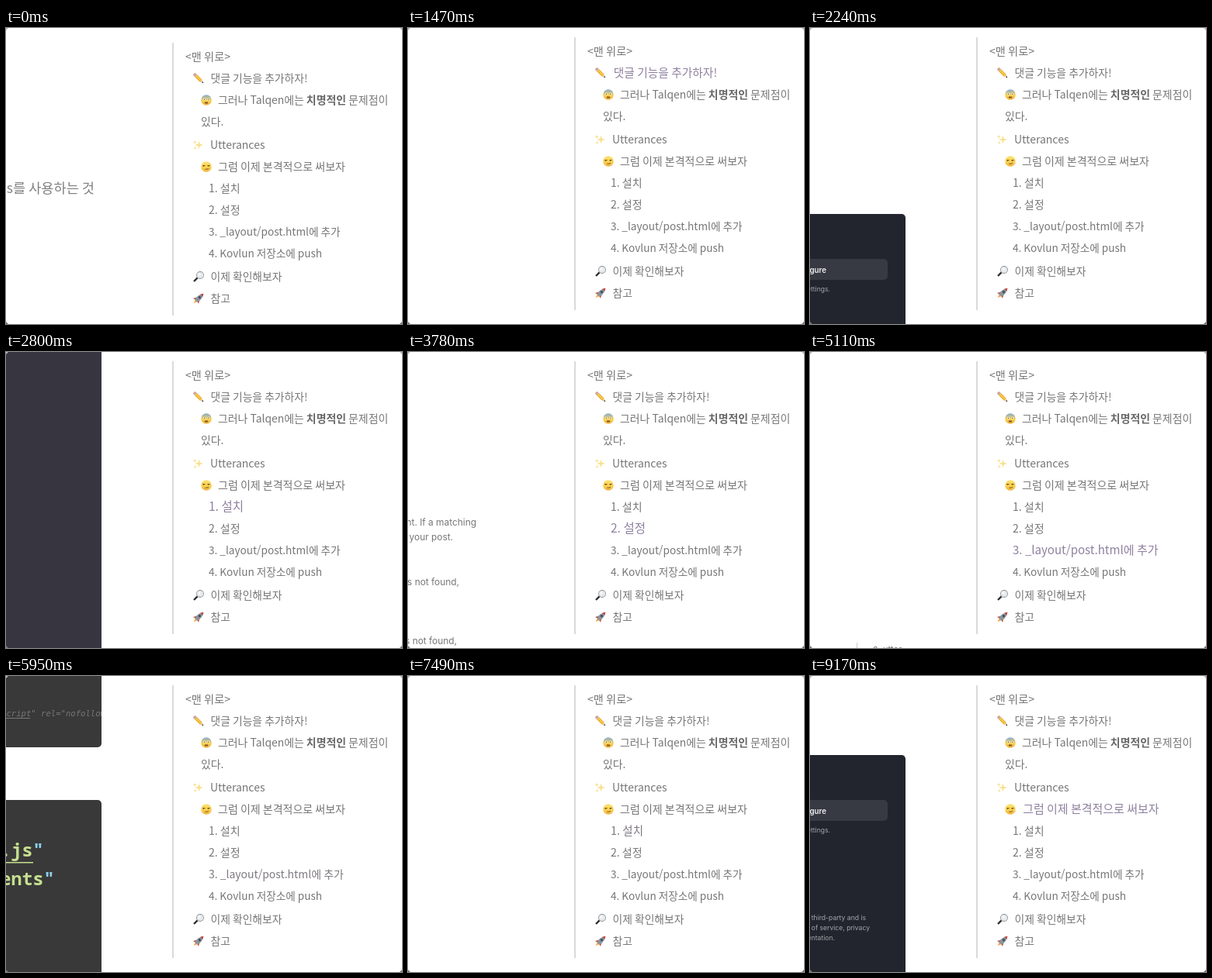
Write an HTML page with a canvas that moves like this. It is 510 px wide and 382 px high and loops after 9.45 s.

```html
<!DOCTYPE html>
<html lang="ko">
<head>
<meta charset="utf-8">
<title>Table of contents</title>
<style>
html, body { margin: 0; width: 100%; height: 100%; overflow: hidden; background: #fff; }
canvas { display: block; width: 510px; height: 382px; }
</style>
</head>
<body>
<canvas id="stage"></canvas>
<script>
const W = 510, H = 382, LOOP = 9450, TICK = 70, FADE = 210;
const KR = '"Noto Sans CJK KR", "Noto Sans CJK", sans-serif';
const MONO = '"Noto Sans Mono", "DejaVu Sans Mono", monospace';
const canvas = document.getElementById('stage');
const ctx = canvas.getContext('2d');
const dpr = window.devicePixelRatio || 1;
canvas.width = W * dpr;
canvas.height = H * dpr;

// [time, scroll position]
const scrollKeys = [
  [0, 0], [560, 0], [840, 40], [910, 40], [980, 50], [1050, 50], [1190, 117],
  [1400, 117], [1470, 250], [1610, 330], [1680, 330], [1960, 560], [2030, 560],
  [2240, 760], [2380, 760], [2800, 1600], [2940, 1600], [3010, 1882], [3150, 1882],
  [3780, 2400], [3920, 2430], [3990, 2430], [4130, 2470], [4200, 2470], [4760, 2800],
  [4830, 2800], [4970, 2940], [5040, 2940], [5110, 3000], [5530, 3720], [5950, 3500],
  [6020, 3420], [6370, 560], [8540, 560], [9170, 898], [LOOP, 898]
];

// on: pairs of [start of highlight, start of fade-out]
const items = [
  { y: 30, x: 231, text: '<맨 위로>', size: 14.2 },
  { y: 58, x: 263.5, text: '댓글 기능을 추가하자!', size: 13.8, icon: pencil, ix: 248, on: [[1260, 1540]] },
  { y: 86, x: 273, text: '그러나 Talqen에는 ', bold: '치명적인', tail: ' 문제점이', size: 13.9,
    icon: fearful, ix: 258, on: [[1540, 1750]] },
  { y: 144, x: 263, text: 'Utterances', icon: sparkles, ix: 247, on: [[2380, 2590], [8050, 8610]] },
  { y: 172, x: 273, text: '그럼 이제 본격적으로 써보자', icon: smirk, ix: 258, on: [[8680, 9900]] },
  { y: 200, x: 261, text: '1. 설치', on: [[2590, 3220], [7070, 7350]], grow: .11 },
  { y: 228, x: 261, text: '2. 설정', on: [[3500, 4340], [6720, 7000]], grow: .11 },
  { y: 256, x: 261, text: '3. _layout/post.html에 추가', size: 13.6,
    on: [[4480, 5180], [5900, 6160]], grow: .107 },
  { y: 284, x: 261, text: '4. Kovlun 저장소에 push', size: 13.6, on: [[5250, 5670]] },
  { y: 314, x: 263.5, text: '이제 확인해보자', size: 13.8, icon: magnifier, ix: 248 },
  { y: 342, x: 263.5, text: '참고', size: 13.8, icon: rocket, ix: 248 }
];

const clamp = v => Math.max(0, Math.min(1, v));
const mix = (a, b, k) => a + (b - a) * k;

function scrollAt(t) {
  const i = scrollKeys.findIndex(k => k[0] > t);
  const [t0, s0] = scrollKeys[i - 1], [t1, s1] = scrollKeys[i];
  return Math.round(mix(s0, s1, (t - t0) / (t1 - t0)));
}

function highlight(item, t) {
  return Math.max(0, ...(item.on || []).map(([a, b]) =>
    Math.min(clamp((t - a) / FADE), 1 - clamp((t - b) / FADE))));
}

function write(str, x, y, font, color, align = 'left') {
  ctx.font = font;
  ctx.fillStyle = color;
  ctx.textAlign = align;
  ctx.fillText(str, x, y);
  return x + ctx.measureText(str).width;
}

function box(x, y, w, h, r, color) {
  ctx.fillStyle = color;
  ctx.beginPath();
  ctx.roundRect(x, y, w, h, r);
  ctx.fill();
}

function disc(x, y, r, color) {
  ctx.fillStyle = color;
  ctx.beginPath();
  ctx.arc(x, y, r, 0, 7);
  ctx.fill();
}

function poly(color, ...p) {
  ctx.fillStyle = color;
  ctx.beginPath();
  for (let i = 0; i < p.length; i += 2) ctx.lineTo(p[i], p[i + 1]);
  ctx.fill();
}

function stroke(color, width, path) {
  ctx.strokeStyle = color;
  ctx.lineWidth = width;
  ctx.stroke(new Path2D(path));
}

// Icons, drawn around 0,0
function pencil() {
  ctx.rotate(Math.PI / 4);
  box(-8.5, -2, 3, 4, 1.2, '#d9a08e');
  box(-6.2, -2, 1.6, 4, 0, '#b9b4a8');
  box(-4.6, -2, 9.4, 4, 0, '#eba62c');
  box(-4.6, -1, 9.4, 1.6, 0, '#fbd04f');
  poly('#e6cba4', 4.8, -2, 8.6, 0, 4.8, 2);
  poly('#333', 6.8, -1, 9, 0, 6.8, 1);
}

function face(top) {
  const g = ctx.createLinearGradient(0, -7, 0, 7);
  g.addColorStop(0, top);
  g.addColorStop(.55, '#fad24f');
  g.addColorStop(1, '#eeae3a');
  disc(0, 0, 6.8, g);
}

function fearful() {
  face('#7fa9d6');
  disc(-2.5, -.8, 1.4, '#fff');
  disc(2.5, -.8, 1.4, '#fff');
  disc(-2.5, -.7, .7, '#4b3420');
  disc(2.5, -.7, .7, '#4b3420');
  box(-2.2, 2.6, 4.4, 1.8, .9, '#7a5228');
}

function smirk() {
  face('#fde272');
  stroke('#7d5a28', 1, 'M-4.8-1.4H-1.4M1.4-1.4H4.8M-1.6 3.2Q1.2 3.6 3 2.2');
  disc(-3.4, -.9, .8, '#6b451f');
  disc(2.6, -.9, .8, '#6b451f');
}

function star(x, y, r) {
  ctx.fillStyle = '#f8df88';
  ctx.beginPath();
  for (let i = 0; i < 8; i++) {
    const d = i % 2 ? r * .3 : r, a = i * Math.PI / 4;
    ctx.lineTo(x + d * Math.cos(a), y + d * Math.sin(a));
  }
  ctx.fill();
}

function sparkles() {
  star(1.6, 0, 5.4);
  star(-3.8, -3.6, 2.8);
  star(-3.4, 4, 2.6);
}

function magnifier() {
  stroke('#2f2f2f', 2.4, 'M-1.4 1.4L-6 6');
  disc(2, -2, 4.9, '#8b8e90');
  disc(2, -2, 4.1, '#e6eaec');
  disc(1, -3, 1.8, '#f6f9fa');
}

function rocket() {
  ctx.rotate(Math.PI / 4);
  poly('#f3a63a', -1.8, 4, 0, 9, 1.8, 4);
  poly('#b8423c', -2, 0, -5, 5, -2, 4);
  poly('#b8423c', 2, 0, 5, 5, 2, 4);
  ctx.fillStyle = '#8d939b';
  ctx.fill(new Path2D('M0-9Q4.6-3 2.2 4.6H-2.2Q-4.6-3 0-9Z'));
  poly('#c2443f', 0, -9, 2.2, -5.4, -2.2, -5.4);
  disc(0, -2, 1.5, '#34495e');
}

function drawItem(item, t) {
  const k = highlight(item, t);
  const size = (item.size || 14) * (1 + (item.grow || .07) * k);
  const color = `rgb(${mix(118, 142, k)},${mix(118, 128, k)},${mix(118, 158, k)})`;
  const font = `300 ${size}px ${KR}`;
  const y = item.y + 5.2;
  let x = write(item.text, item.x + k * (item.icon ? 1.2 : 0), y, font, color);
  if (item.icon) {
    ctx.save();
    ctx.translate(item.ix, item.y);
    item.icon();
    ctx.restore();
  }
  if (!item.bold) return;
  x = write(item.bold, x, y, `700 ${size}px ${KR}`, k ? color : '#686868');
  // the last word drops to the next line when it no longer fits
  const fits = x + ctx.measureText(item.tail).width < 498;
  if (fits) write(item.tail, x, y, font, color);
  write(fits ? '있다.' : '문제점이 있다.', 251, y + 28, font, color);
}

function drawToc(t, shift) {
  ctx.save();
  ctx.translate(0, shift);
  box(214, 12, 2, 352, 0, '#d9d9d9');
  items.forEach(item => drawItem(item, t));
  ctx.restore();
}

function drawArticle() {
  write('Utterances를 사용하는 것', 114, 213, `300 17.6px ${KR}`, '#808080', 'right');

  // settings panel
  box(-20, 1000, 143, 400, 5, '#22252d');
  box(-20, 1058, 120, 27, 5, '#373a42');
  write('Configure', 21, 1075.5, '600 9.8px Inter, sans-serif', '#f0f0f2', 'right');
  const note = (s, x, y) => write(s, x, y, '8.6px Inter, sans-serif', '#a5a7ad', 'right');
  note('settings.', 26, 1100);
  note('by a third-party and is', 72, 1213);
  note('terms of service, privacy', 77, 1226);
  note('documentation.', 32, 1239);

  box(-20, 1440, 143, 560, 5, '#37353f');

  const line = (s, x, y) => write(s, x, y, '11.9px Inter, sans-serif', '#777', 'right');
  line('comment. If a matching', 88, 2624);
  line('to your post.', 58, 2643);
  line('is not found,', 66, 2701);
  line('is not found,', 63, 2777);

  box(60, 3375, 1, 45, 0, '#ccc');
  write('2. utter', 81, 3388, '11px Inter, sans-serif', '#777');

  // code blocks
  box(-20, 3450, 143, 142, 5, '#393939');
  write('script" rel="nofollow"', -6, 3552, 'italic 10.6px "DejaVu Sans Mono", monospace', '#777');
  box(0, 3554, 31, 1, 0, '#777');
  box(-20, 3660, 143, 300, 5, '#393939');
  code('client.js', 48.5, 3733);
  box(0, 3740, 35, 1.5, 0, '#c5df8f');
  code('comments', 62.5, 3770);
}

function code(str, right, y) {
  const font = `600 23.3px ${MONO}`;
  write('"', right, y, font, '#8bcfe8', 'right');
  write(str, right - ctx.measureText('"').width, y, font, '#c5df8f', 'right');
}

function drawCorners() {
  for (const [x, y, color] of [[0, 0, '#bbb'], [W, 0, '#bbb'], [0, H, '#777'], [W, H, '#777']]) {
    const dx = x ? -3 : 3, dy = y ? -3 : 3;
    poly(color, x, y, x + dx, y, x, y + dy);
  }
}

function draw(now) {
  const t = Math.floor(now % LOOP / TICK) * TICK;
  const scroll = scrollAt(t);
  ctx.setTransform(dpr, 0, 0, dpr, 0, 0);
  ctx.fillStyle = '#fff';
  ctx.fillRect(0, 0, W, H);
  ctx.save();
  ctx.beginPath();
  ctx.rect(0, 0, 123, H);
  ctx.clip();
  ctx.translate(0, -scroll);
  drawArticle();
  ctx.restore();
  drawToc(t, Math.max(0, 7 - scroll));
  drawCorners();
}

const start = performance.now();
function loop() {
  draw(performance.now() - start);
  requestAnimationFrame(loop);
}
loop();
</script>
</body>
</html>
```
